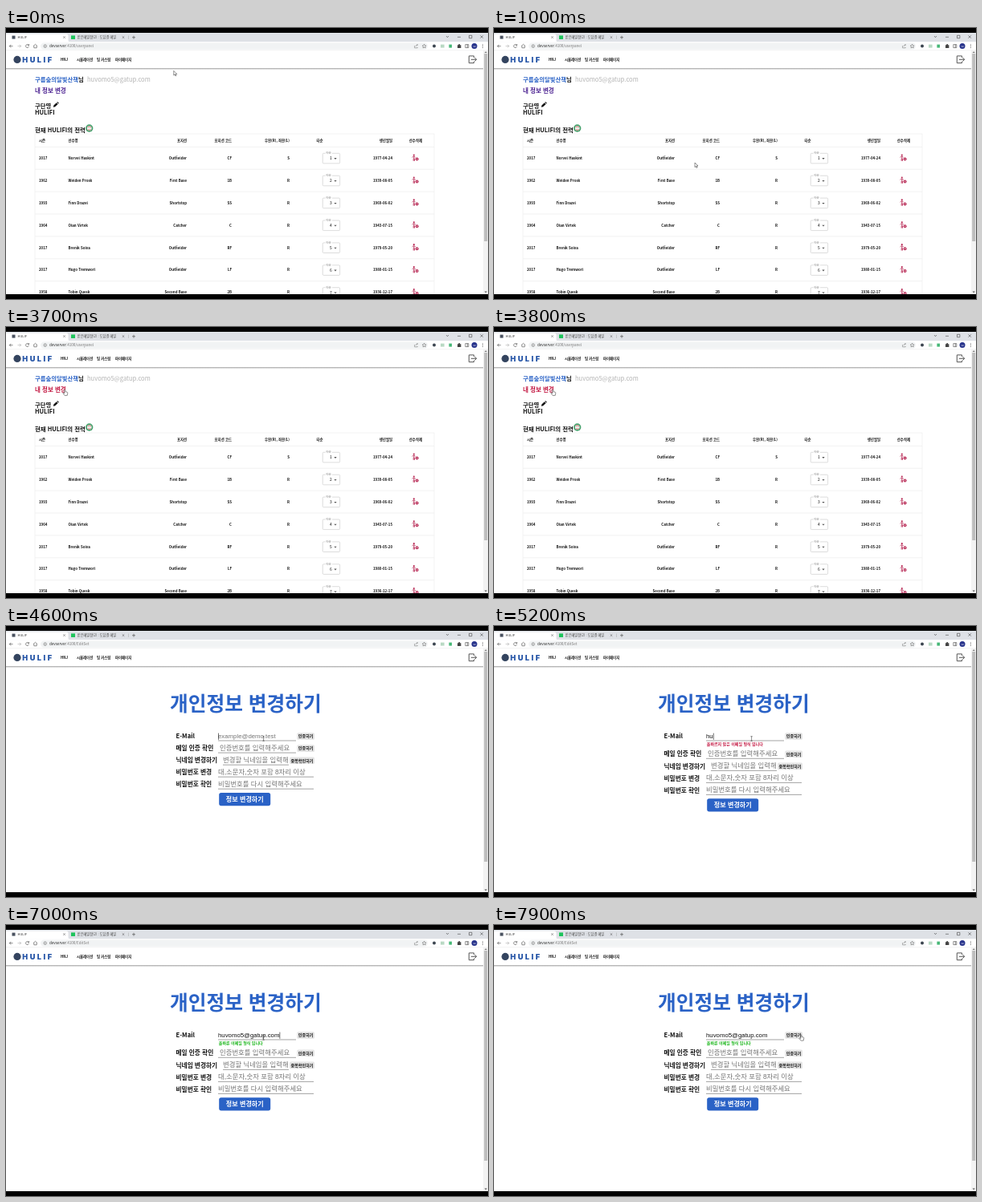
An HTML page that plays this animation: 600 by 338 pixels, repeating every 8 s.

```html
<!DOCTYPE html>
<html lang="ko">
<head>
<meta charset="utf-8">
<title>HULIF</title>
<style>
  html, body { margin: 0; width: 100%; height: 100%; overflow: hidden; background: #000; }
  svg { display: block; width: 100vw; height: 100vh; }
  text { font-family: "Noto Sans CJK KR", "Noto Sans CJK", sans-serif; white-space: pre; }
  .field { font-family: "Liberation Sans", "Noto Sans CJK KR", sans-serif; }
  .brand { font-family: Inter, sans-serif; }
</style>
</head>
<body>
<svg id="stage" viewBox="0 0 600 338"></svg>
<script>
const LOOP = 8000;
const BLUE = '#2a62c6', RED = '#c2143f', GREEN = '#12b312', INK = '#111';
const MAIL = 'huvomo5@gatup.com';
const stage = document.getElementById('stage');

function el(parent, tag, attrs = {}, content) {
  const node = document.createElementNS('http://www.w3.org/2000/svg', tag);
  for (const key in attrs) node.setAttribute(key, attrs[key]);
  if (content !== undefined) node.textContent = content;
  parent.appendChild(node);
  return node;
}
const group = (parent, attrs) => el(parent, 'g', attrs);
const rect = (parent, x, y, width, height, fill, more) =>
  el(parent, 'rect', { x, y, width, height, fill, ...more });
const circle = (parent, cx, cy, r, fill, more) => el(parent, 'circle', { cx, cy, r, fill, ...more });
const text = (parent, x, y, size, content, more) =>
  el(parent, 'text', { x, y, 'font-size': size, fill: INK, 'font-weight': 500, ...more }, content);
const line = (parent, d, stroke = '#555', width = .7, more) =>
  el(parent, 'path', { d, stroke, 'stroke-width': width, fill: 'none', ...more });
const shape = (parent, d, fill, more) => el(parent, 'path', { d, fill, ...more });
const show = (node, on) => node.setAttribute('display', on ? 'inline' : 'none');
const BOLD = { 'font-weight': 700 };
const END = { 'text-anchor': 'end' };
const MIDDLE = { 'text-anchor': 'middle' };

const defs = el(stage, 'defs');
const clip = el(defs, 'clipPath', { id: 'view' });
rect(clip, 0, 6, 600, 326, '#000');
const fade = el(defs, 'linearGradient', { id: 'fade', x2: 0, y2: 1 });
el(fade, 'stop', { offset: 0, 'stop-color': '#8a8a8a' });
el(fade, 'stop', { offset: 1, 'stop-color': '#fff', 'stop-opacity': 0 });

rect(stage, 0, 0, 600, 338, '#000');
const screen = group(stage, { 'clip-path': 'url(#view)' });
rect(screen, 0, 6, 600, 326, '#fff');

const profile = group(screen);
const edit = group(screen);
const url = buildBrowser(group(screen));
buildHeader(group(screen));
const thumb = rect(screen, 595.2, 32, 4, 234, '#bdbdbd');
const link = buildProfile(profile);
const form = buildForm(edit);
const cursors = buildCursors(group(screen));

function buildBrowser(g) {
  rect(g, 0, 6, 600, 11.5, '#dee1e6');
  shape(g, 'M0 17.5V7.5H75Q77.5 7.5 77.5 10V15Q77.5 17.5 80 17.5Z', '#fff');
  rect(g, 7.5, 9.6, 4, 4, '#4a5260');
  text(g, 14.5, 13.1, 4, 'HULIF', { fill: '#333' });
  rect(g, 81, 9.4, 5, 4.6, '#1fc45c');
  text(g, 88.8, 13.2, 4.2, '받은메일함(2) : 도담결 메일', { fill: '#444', 'font-weight': 400 });
  for (const x of [72.5, 146]) line(g, `M${x - 1.3} 10.3l2.6 2.6m0 -2.6l-2.6 2.6`, '#444', .5);
  line(g, 'M152.5 9.5v4.5', '#999', .4);
  line(g, 'M157 11.7h4M159 9.7v4', '#444', .6);
  line(g, 'M548 10l1.5 1.7L551 10M562 11.3h4M576.5 9.3h3.4v3.4h-3.4zM590.5 9.3l3.4 3.4m0 -3.4l-3.4 3.4', '#222', .5);

  rect(g, 0, 17.3, 600, 10.7, '#fff');
  rect(g, 43, 18.4, 482, 8.4, '#f1f3f4', { rx: 4.2 });
  line(g, 'M14 22.6h-4.2m1.9 -1.9l-1.9 1.9l1.9 1.9', '#444', .6, { transform: 'translate(-5.5 0)' });
  line(g, 'M14.5 22.6h4.2m-1.9 -1.9l1.9 1.9l-1.9 1.9', '#aaa', .6);
  line(g, 'M28.3 21.6a2 2 0 1 0 .1 1.7M28.6 20v1.8h-1.8', '#444', .6);
  line(g, 'M34 22.6l2.5 -2.3l2.5 2.3M34.8 22.2v2.6h3.4v-2.6', '#444', .6);
  circle(g, 48.7, 22.6, 1.8, 'none', { stroke: '#555', 'stroke-width': .5 });
  line(g, 'M48.7 22.3v1.4M48.7 21.4v.4', '#555', .5);
  const address = text(g, 54, 24.3, 4.55, 'devserver', { fill: '#222', 'font-weight': 400 });
  const path = el(address, 'tspan', { fill: '#777' }, '');
  line(g, 'M508.6 22v2.8h3.6v-1M510 23q.3 -2 2.5 -2m-1 -1l1 1l-1 1', '#666', .5);
  line(g, 'M520.6 20.2l.8 1.6l1.7 .2l-1.3 1.2l.4 1.7l-1.6 -.9l-1.6 .9l.4 -1.7l-1.3 -1.2l1.7 -.2z', '#555', .5);
  circle(g, 533, 22.6, 2, '#3c4550');
  rect(g, 541, 20.6, 4.6, 4, '#b9d9c4');
  rect(g, 551.4, 20.6, 3.6, 4, '#48b878');
  shape(g, 'M562 21.3h1.4a.9 .9 0 1 1 1.6 0h1.4v3.6h-4.4z', '#444');
  line(g, 'M571.8 20.6h4v4h-4zM574.3 20.6v4', '#444', .6);
  circle(g, 583, 22.6, 3.5, '#28348c');
  text(g, 583, 23.7, 3, 'su', { fill: '#fff', ...MIDDLE });
  for (const y of [20.8, 22.6, 24.4]) circle(g, 593.3, y, .5, '#444');
  line(g, 'M0 28h600', '#d5d7da', .5);
  return path;
}

function buildHeader(g) {
  rect(g, 594, 28.3, 6, 304, '#f3f3f3');
  shape(g, 'M595.5 31l1.7 -1.8l1.7 1.8z', '#777');
  shape(g, 'M595.5 328.4l1.7 1.8l1.7 -1.8z', '#555');
  rect(g, 0, 50, 594, 3, 'url(#fade)');
  rect(g, 0, 28.3, 594, 21.8, '#fff');
  circle(g, 14, 39.4, 4.6, '#34445f');
  text(g, 20.3, 42.7, 9.2, 'HULIF', {
    class: 'brand', fill: '#2857a8', 'font-weight': 900, 'letter-spacing': 2.5
  });
  [[68, 'HNJ'], [88, '시뮬레이션'], [113, '팀 커스텀'], [136, '마이페이지']]
    .forEach(([x, label]) => text(g, x, 40.7, 4.4, label, BOLD));
  line(g, 'M582.5 36.8v-1.9h-6.2v8.8h6.2v-1.9M578.8 39.3h6.8m-2.2 -2.3l2.3 2.3l-2.3 2.3', '#555', 1);
}

function buildProfile(g) {
  const name = text(g, 36, 67.2, 7.35, '구름숲의달빛산책', { fill: BLUE, ...BOLD });
  el(name, 'tspan', { fill: INK }, '님');
  text(g, 101, 67.2, 7.6, MAIL, { fill: '#b4b4b4', 'font-weight': 400 });
  const changeLink = text(g, 36, 80.6, 7.5, '내 정보 변경', BOLD);
  text(g, 36, 99.9, 7.3, '구단명', BOLD);
  shape(g, 'M58.8 98.8l.6 -2.2l3.4 -3.3l1.8 1.7l-3.5 3.3zM63.3 92.8l.8 -.7l1.8 1.7l-.8 .8z', INK);
  text(g, 36, 108, 7.4, 'HULIFI', BOLD);
  text(g, 36, 129.6, 7.4, '현재 HULIFI의 전력', BOLD);
  circle(g, 103.7, 125, 4.7, '#46a06c');
  circle(g, 103.7, 125, 3, '#e9efe9');
  line(g, 'M101.6 123.6q2.1 -1.6 4.2 0M101.8 126.7q1.9 1.2 3.8 0', '#d0575b', .9);

  const top = 132, head = 16.3, pitch = 27.9;
  rect(g, 36, top, 497, 210, '#fff', { stroke: '#ececec', 'stroke-width': .6 });
  const cell = (x, y, label, more) => text(g, x, y, 4.4, label, { ...BOLD, ...more });
  const headings = [
    [41, '시즌'], [77.5, '선수명'], [225, '포지션', END], [281, '포지션 코드', END],
    [353, '우완(R), 좌완(L)', END], [386.5, '타순'], [481, '생년월일', END], [518, '선수삭제', END]
  ];
  headings.forEach(([x, label, anchor]) => cell(x, 141.5, label, anchor));

  const players = [
    '2017|Norvel Haskint|Outfielder|CF|S|1977-04-24',
    '1962|Welden Prosk|First Base|1B|R|1939-08-05',
    '1993|Finn Drazel|Shortstop|SS|R|1969-06-02',
    '1964|Olan Virtek|Catcher|C|R|1943-07-15',
    '2017|Brenik Solva|Outfielder|RF|R|1979-05-20',
    '2017|Hugo Tremworl|Outfielder|LF|R|1980-01-15',
    '1958|Tobin Quesk|Second Base|2B|R|1936-12-17'
  ];
  players.forEach((player, i) => {
    const mid = 162.3 + i * pitch, base = mid + 1.6;
    line(g, `M36 ${top + head + i * pitch}h497`, '#e8e8e8', .6);
    const [season, full, position, code, hand, born] = player.split('|');
    cell(41, base, season);
    cell(77.5, base, full);
    [[225, position], [281, code], [353, hand], [481, born]].forEach(([x, s]) => cell(x, base, s, END));
    rect(g, 394.2, mid - 6, 21.4, 12.6, 'none', { rx: 1.2, stroke: '#c4c4c4', 'stroke-width': .6 });
    rect(g, 397.6, mid - 7, 8.4, 2, '#fff');
    text(g, 398.4, mid - 5, 3.5, '타순', { fill: '#777', 'font-weight': 400 });
    text(g, 404.4, mid + 2.1, 4.9, i + 1, MIDDLE);
    shape(g, `M408.3 ${mid - .2}h3.4l-1.7 1.8z`, '#555');
    const icon = group(g, { transform: `translate(509 ${mid - .4})` });
    circle(icon, -1.2, -3.3, 1.1, '#b92d58');
    line(icon, 'M-3.4 -.6q1 -1 2.2 -1t2 1.2M-1.2 -1.4v2.8M-1.8 1v3M-.5 1v3', '#b92d58', .9);
    circle(icon, 2.6, 1.7, 2, '#b92d58');
    line(icon, 'M1.8 .9l1.6 1.6m0 -1.6l-1.6 1.6', '#fff', .5);
  });
  return changeLink;
}

function buildForm(g) {
  text(g, 204, 105.6, 24.7, '개인정보 변경하기', { fill: BLUE, 'font-weight': 700 });
  const row = (parent, y, label, x, right, hint, start = x) => {
    text(parent, 211.5, y, 7.7, label, BOLD);
    line(parent, `M${start} ${y + 2.8}H${right}`, '#666', .6);
    if (hint) text(parent, x, y - .1, 8.4, hint, { class: 'field', fill: '#757575', 'font-weight': 400 });
  };
  const button = (parent, x, y, label) => {
    rect(parent, x, y - 7, 384 - x, 8.6, '#e4e4e4', { rx: 1.5 });
    text(parent, (x + 384) / 2, y - .9, 5.1, label, { ...MIDDLE, ...BOLD });
  };
  row(g, 140.2, 'E-Mail', 264, 361);
  button(g, 362.3, 140.2, '인증하기');
  const value = text(g, 264, 140.4, 7.8, '', { class: 'field', 'font-weight': 400 });
  const caret = rect(g, 264, 133.6, .6, 8.2, '#111');
  const note = text(g, 264.8, 149.4, 5, '', BOLD);

  const rest = group(g);
  row(rest, 155.3, '메일 인증 확인', 266, 361, '인증번호를 입력해주세요', 264);
  button(rest, 362.3, 155.3, '인증하기');
  row(rest, 170.4, '닉네임 변경하기', 270, 352, '변경할 닉네임을 입력해');
  button(rest, 353, 170.4, '중복확인하기');
  row(rest, 185.4, '비밀번호 변경', 264, 383, '대,소문자,숫자 포함 8자리 이상');
  row(rest, 200.4, '비밀번호 확인', 264, 383, '비밀번호를 다시 입력해주세요');
  rect(rest, 265.2, 208, 64, 16.2, BLUE, { rx: 2.6 });
  text(rest, 297.3, 219.2, 8.1, '정보 변경하기', { fill: '#fff', ...MIDDLE, ...BOLD });
  return { value, caret, note, rest };
}

function buildCursors(g) {
  const arrow = group(g), beam = group(g), hand = group(g);
  const outline = { stroke: '#222', 'stroke-width': .5, 'stroke-linejoin': 'round' };
  shape(arrow, 'M0 0v5.6l1.3 -1.2l.9 2l.9 -.4l-.9 -2h1.8z', '#fff', outline);
  line(beam, 'M-1.2 -2.8h2.4M0 -2.8v5.6M-1.2 2.8h2.4', '#222', .5);
  shape(hand, 'M-.7 -3.4q.6 -.6 1.2 0v2.1l2.3 .6q.6 .3 .5 1l-.6 3.1h-3.1l-2.2 -2.7q.2 -.9 1 -.5l.9 .6z', '#fff', outline);
  return { arrow, beam, hand };
}

// Pointer keys: time, x, y
const PATH = [
  [0, 208.8, 53.4], [150, 208.8, 53.4], [1000, 250, 168], [1900, 250, 168], [2450, 92, 85],
  [2750, 92, 85], [3100, 69, 84.5], [3620, 69, 84.5], [3700, 73.5, 82], [3900, 73.5, 82],
  [4500, 320.6, 140.5], [7150, 320.6, 140.5], [7600, 398, 147], [7880, 382.5, 140.8], [8000, 382.5, 140.8]
];
function pointerAt(t) {
  const i = PATH.findIndex(key => key[0] > t);
  const [t0, x0, y0] = PATH[i - 1], [t1, x1, y1] = PATH[i];
  const p = (t - t0) / (t1 - t0), k = p * p * (3 - 2 * p);
  return [x0 + (x1 - x0) * k, y0 + (y1 - y0) * k];
}

function typedCount(t) {
  if (t < 5000) return 0;
  if (t < 6100) return Math.min(7, 1 + Math.floor((t - 5000) / 115));
  return Math.min(MAIL.length, 8 + Math.floor((t - 6100) / 88));
}

function render(t) {
  const onForm = t >= 3900;
  show(profile, !onForm);
  show(edit, onForm);
  url.textContent = onForm ? ':4100/EditSet' : ':4100/userpanel';
  thumb.setAttribute('height', onForm ? 262 : 234);
  const linkHover = t >= 3650 && !onForm;
  link.setAttribute('fill', linkHover ? RED : '#4b2191');

  const count = typedCount(t), { value, caret, note, rest } = form;
  value.textContent = count ? MAIL.slice(0, count) : 'example@demo.test';
  value.setAttribute('fill', count ? INK : '#757575');
  const valid = count >= MAIL.length - 1;
  note.textContent = !count ? '' : valid ? '올바른 이메일 형식 입니다' : '올바르지 않은 이메일 형식 입니다';
  note.setAttribute('fill', valid ? GREEN : RED);
  rest.setAttribute('transform', `translate(0 ${count ? 7.2 : 0})`);
  caret.setAttribute('x', 264 + (count && onForm ? value.getComputedTextLength() + .2 : 0));
  show(caret, t >= 4400 && (t < 7000 || t % 1000 < 500));

  const [x, y] = pointerAt(t);
  const overField = onForm && x > 264 && x < 361 && y > 132 && y < 143;
  const overButton = t > 7500 && x < 385;
  const kind = linkHover || overButton ? 'hand' : overField ? 'beam' : 'arrow';
  for (const name in cursors) {
    show(cursors[name], name === kind);
    cursors[name].setAttribute('transform', `translate(${x} ${y})`);
  }
}

const start = performance.now();
function tick() {
  render((performance.now() - start) % LOOP);
  requestAnimationFrame(tick);
}
tick();
</script>
</body>
</html>
```
